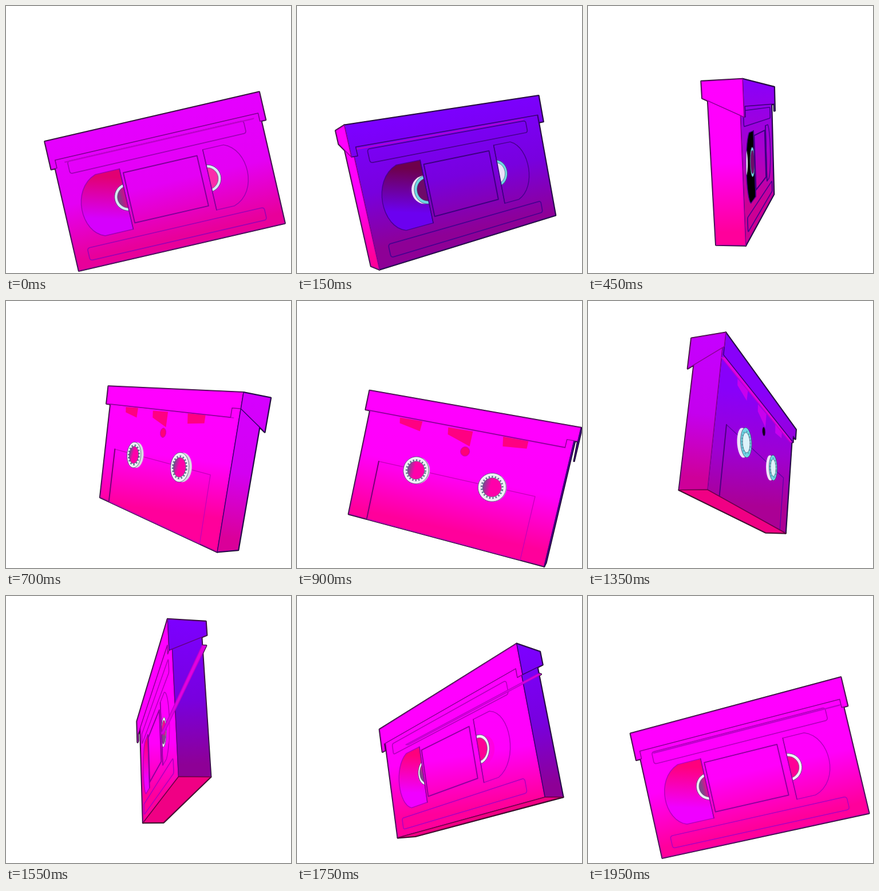
Animation, 498 px wide and 466 px high, one loop 2000 ms. Source, as an HTML page with a canvas:

```html
<!DOCTYPE html>
<html lang="en">
<head>
<meta charset="utf-8">
<title>Spinning cassette</title>
<style>
html, body { margin: 0; width: 100%; height: 100%; overflow: hidden; background: #fff; }
canvas { display: block; }
</style>
</head>
<body>
<canvas id="stage" width="498" height="466"></canvas>
<script>
const ctx = document.getElementById('stage').getContext('2d');
const LOOP = 2000, STEP = 50, FOCAL = 780, EYE = [256, 348];
const ROLL = 13 * Math.PI / 180;
const W = 183, H = 115, D = 22;      // half sizes of the body
const FW = 189, FD = 28;             // half sizes of the lid

// time in ms, turn in degrees
const TURN = [[-50, -9.4], [0, 0], [150, 26.6], [450, 78.5], [900, 163.3],
  [1350, 246.5], [1750, 311], [1950, 350.6], [2000, 360], [2150, 386.6]];

const clamp = x => Math.max(0, Math.min(1, x));
const mix = (a, b, k) => a.map((x, i) => x + (b[i] - x) * k);
const rgb = c => `rgb(${c.map(Math.round).join(',')})`;

function turnAt(t) {
  let i = 1;
  while (t >= TURN[i + 1][0]) i++;
  const slope = j => (TURN[j + 1][1] - TURN[j - 1][1]) / (TURN[j + 1][0] - TURN[j - 1][0]);
  const [t0, a] = TURN[i], [t1, b] = TURN[i + 1];
  const d = t1 - t0, s = (t - t0) / d, r = 1 - s;
  return a * r * r * (1 + 2 * s) + b * s * s * (3 - 2 * s)
    + d * s * r * (r * slope(i) - s * slope(i + 1));
}

let sin = 0, cos = 1, centre = [0, 0];

function project([x, y, z]) {
  const rx = x * Math.cos(ROLL) + y * Math.sin(ROLL);
  const ry = y * Math.cos(ROLL) - x * Math.sin(ROLL);
  const s = FOCAL / (FOCAL + 15 - (z * cos - rx * sin));
  return [EYE[0] + s * (centre[0] - EYE[0] + rx * cos + z * sin),
    EYE[1] + s * (centre[1] - EYE[1] + ry)];
}

function trace(points) {
  ctx.beginPath();
  points.map(project).forEach(p => ctx.lineTo(...p));
  ctx.closePath();
}

function paint(points, fill, line, width = 1.2) {
  trace(points);
  if (fill) { ctx.fillStyle = fill; ctx.fill(); }
  if (line) { ctx.strokeStyle = line; ctx.lineWidth = width; ctx.stroke(); }
}

function facesEye(points) {
  const p = points.map(project);
  return p.reduce((sum, [x, y], i) => {
    const [nx, ny] = p[(i + 1) % p.length];
    return sum + x * ny - nx * y;
  }, 0) > 0;
}

function gradient(from, to, ...colours) {
  const g = ctx.createLinearGradient(...project(from), ...project(to));
  colours.forEach(([at, c]) => g.addColorStop(at, rgb(c)));
  return g;
}

// violet light comes from the upper right, lean is how far a face looks up
const violet = (nx, lean = 0) => clamp((nx + 0.1 + 2.3 * lean) / 0.5);

function skin({ nx, x = 0, z = 0 }) {
  const k = violet(nx, Math.sign(x) * Math.sin(ROLL));
  const edge = z ? clamp((nx - 0.7) / 0.3) : 0;
  const top = mix(mix([255, 0, 255], [124, 0, 255], k), [140, 0, 248], edge);
  const mid = mix(mix([255, 0, 250], [120, 0, 222], k), [172, 0, 205], edge);
  const low = mix(mix([255, 0, 155], [142, 0, 150], k), [218, 0, 148], edge ** 3);
  return gradient([x, -H, z], [x, H, z], [0, top], [0.5, mid], [0.92, low]);
}

// flat outlines in face coordinates
const box = (l, t, r, b) => [[l, t], [r, t], [r, b], [l, b]];
const circle = (x, y, r) => Array.from({ length: 40 }, (_, i) =>
  [x + r * Math.cos(i * Math.PI / 20), y + r * Math.sin(i * Math.PI / 20)]);

function rounded(l, t, r, b, q) {
  const corners = [[r - q, b - q], [l + q, b - q], [l + q, t + q], [r - q, t + q]];
  return corners.flatMap(([x, y], c) => [0, 1, 2, 3].map(i => {
    const a = (c + i / 3) * Math.PI / 2;
    return [x + q * Math.cos(a), y + q * Math.sin(a)];
  }));
}

function bulge(flat, start, reach, end) {
  const points = [[flat, 66], [flat, -41]];
  for (let i = 0; i <= 16; i++) {
    const s = i / 16, r = 1 - s;
    points.push([r ** 3 * start + 3 * r * s * reach + s ** 3 * end,
      -41 * r ** 3 - 75 * r * r * s + 156 * r * s * s + 66 * s ** 3]);
  }
  return points;
}

const SLOTS = [rounded(-160, -74, 153, -52, 4), rounded(-160, 80, 154, 102, 4)];
const WINDOWS = [bulge(-75, -118, -165, -125), bulge(73, 110, 151, 105)];
const MARKS = [
  [[-122, -78], [-78, -79], [-79, -61], [-120, -68]],
  [[-29, -77], [16, -78], [16, -52], [-27, -65]],
  [[69, -79], [112, -80], [112, -67], [72, -63]]
];

function hub(x, y, z, base, inner, k, put, colours) {
  const { foot, hole } = colours;
  const pale = mix([238, 240, 246], [110, 215, 228], k);
  paint(put(circle(x, y, 24), base), rgb(foot));
  paint(put(circle(x, y, 24), z), rgb(pale), 'rgba(50,60,90,.7)', 1);
  const way = Math.sign(z);
  const shade = gradient([way * (x - 14), y, z], [way * (x + 14), y, z],
    [0, mix(hole, [30, 120, 130], 0.55 * (1 - k))], [0.4, hole]);
  paint(put(circle(x, y, inner), z), shade, 'rgba(60,70,100,.6)', 1);
}

function drawFront(nx) {
  const k = violet(nx), put = (pts, z = D) => pts.map(([x, y]) => [x, y, z]);
  const line = rgb(mix([180, 0, 190], [72, 0, 145], k));
  SLOTS.forEach(s => paint(put(s), null, line, 1.7));
  const dark = clamp((nx - 0.7) / 0.2);
  WINDOWS.forEach((shape, i) => {
    ctx.save();
    const top = mix(mix([255, 0, 125], [110, 0, 75], k), [0, 0, 0], dark);
    const low = mix(mix([240, 0, 255], [108, 0, 240], k), [0, 0, 0], dark);
    paint(put(shape), i ? null : gradient([-90, -41, D], [-120, 66, D], [0.1, top], [0.75, low]), line, 1.5);
    trace(put(shape));
    ctx.clip();
    hub(i ? 70 : -71, 9.5, 18, 6, 19, k, put, {
      foot: mix([255, 0, 225], [242, 228, 250], k),
      hole: mix([255, 0, 150], i ? [235, 225, 250] : [110, 10, 105], k)
    });
    ctx.restore();
  });
  const frame = rgb(mix([145, 0, 160], [62, 0, 130], k));
  paint(put(box(-70, -33, 61, 56)), null, frame, 2);
  [-75, 73].forEach(x => paint(put([[x, -41], [x, 66]]), null, frame, 1.6));
}

function drawBack(nx) {
  const k = violet(nx), put = (pts, z = -D) => pts.map(([x, y]) => [-x, y, z]);
  const line = rgb(mix([195, 0, 185], [95, 0, 165], k));
  paint(put(box(-145, 7, 143, H)), null, line, 1.3);
  paint(put([[-145, 7], [-145, H]]), null, rgb(mix([120, 0, 120], [80, 0, 130], k)), 2);
  const mark = rgb(mix([255, 0, 130], [200, 0, 238], k));
  MARKS.forEach(m => paint(put(m), mark));
  paint(put(circle(10, -42, 8)), rgb(mix([255, 0, 120], [20, 0, 25], k)), line, 1);
  [-70, 70].forEach(x => {
    hub(x, 8, -24, -18, 16, k, put, {
      foot: mix([216, 216, 226], [240, 228, 250], k),
      hole: mix([255, 0, 170], [220, 243, 250], k)
    });
    ctx.setLineDash([2.5, 3]);
    paint(put(circle(x, 8, 18), -24), null, `rgba(50,80,110,${0.75 - 0.45 * k})`, 3);
    ctx.setLineDash([]);
  });
}

// visible sides of the body, then of the lid that sits over it
function faces() {
  const t = -105, hem = -80, tab = -66, rear = -93, n = 179;
  const wall = (x, a, b) => [[x, t, a], [x, t, b], [x, H, b], [x, H, a]];
  const body = [
    { pts: [[-W, t, D], [W, t, D], [W, H, D], [-W, H, D]], nx: sin, z: D, detail: drawFront },
    { pts: [[W, t, -D], [-W, t, -D], [-W, H, -D], [W, H, -D]], nx: -sin, z: -D, detail: drawBack },
    { pts: wall(-W, -D, D), nx: -cos, x: -W },
    { pts: wall(W, D, -D), nx: cos, x: W },
    { pts: [[-W, H, D], [W, H, D], [W, H, -D], [-W, H, -D]], fill: [240, 0, 132], line: [110, 0, 70] }
  ];
  const lid = [
    { pts: [[W, hem, -FD], [-172, hem, -FD], [-172, hem, -D], [W, hem, -D]],
      fill: [225, 0, 225], line: [190, 0, 205] },
    { pts: [[-FW, -H, FD], [FW, -H, FD], [FW, tab, FD], [n, tab, FD], [n, hem, FD],
      [-n, hem, FD], [-n, tab, FD], [-FW, tab, FD]], nx: sin, z: FD },
    { pts: [[FW, -H, -FD], [-FW, -H, -FD], [-FW, rear, -FD], [-172, rear, -FD], [-172, hem, -FD],
      [FW, hem, -FD]], nx: -sin, z: -FD },
    { pts: [[-FW, -H, -FD], [-FW, -H, FD], [-FW, tab, FD], [-FW, rear, -FD]], nx: -cos, x: -FW },
    { pts: [[FW, -H, FD], [FW, -H, -FD], [FW, rear, -FD], [FW, tab, FD]], nx: cos, x: FW }
  ];
  return [...body, ...lid].filter(f => facesEye(f.pts));
}

function draw(t) {
  const turn = turnAt(t) * Math.PI / 180;
  sin = Math.sin(turn);
  cos = Math.cos(turn);
  centre = [281, 279.5 + 28.5 * Math.cos(t / LOOP * 4 * Math.PI)];
  ctx.fillStyle = '#fff';
  ctx.fillRect(0, 0, 498, 466);
  ctx.lineJoin = 'round';
  const seen = faces();
  seen.forEach(f => paint(f.pts, null, '#0a000c', 3.2));
  seen.forEach(f => {
    const line = f.line || mix([140, 0, 150], [58, 0, 115], violet(f.nx));
    paint(f.pts, f.fill ? rgb(f.fill) : skin(f), rgb(line), 1.5);
    if (f.detail) f.detail(f.nx);
  });
}

function tick(now) {
  draw(Math.floor(now % LOOP / STEP) * STEP);
  requestAnimationFrame(tick);
}
draw(0);
requestAnimationFrame(tick);
</script>
</body>
</html>
```
